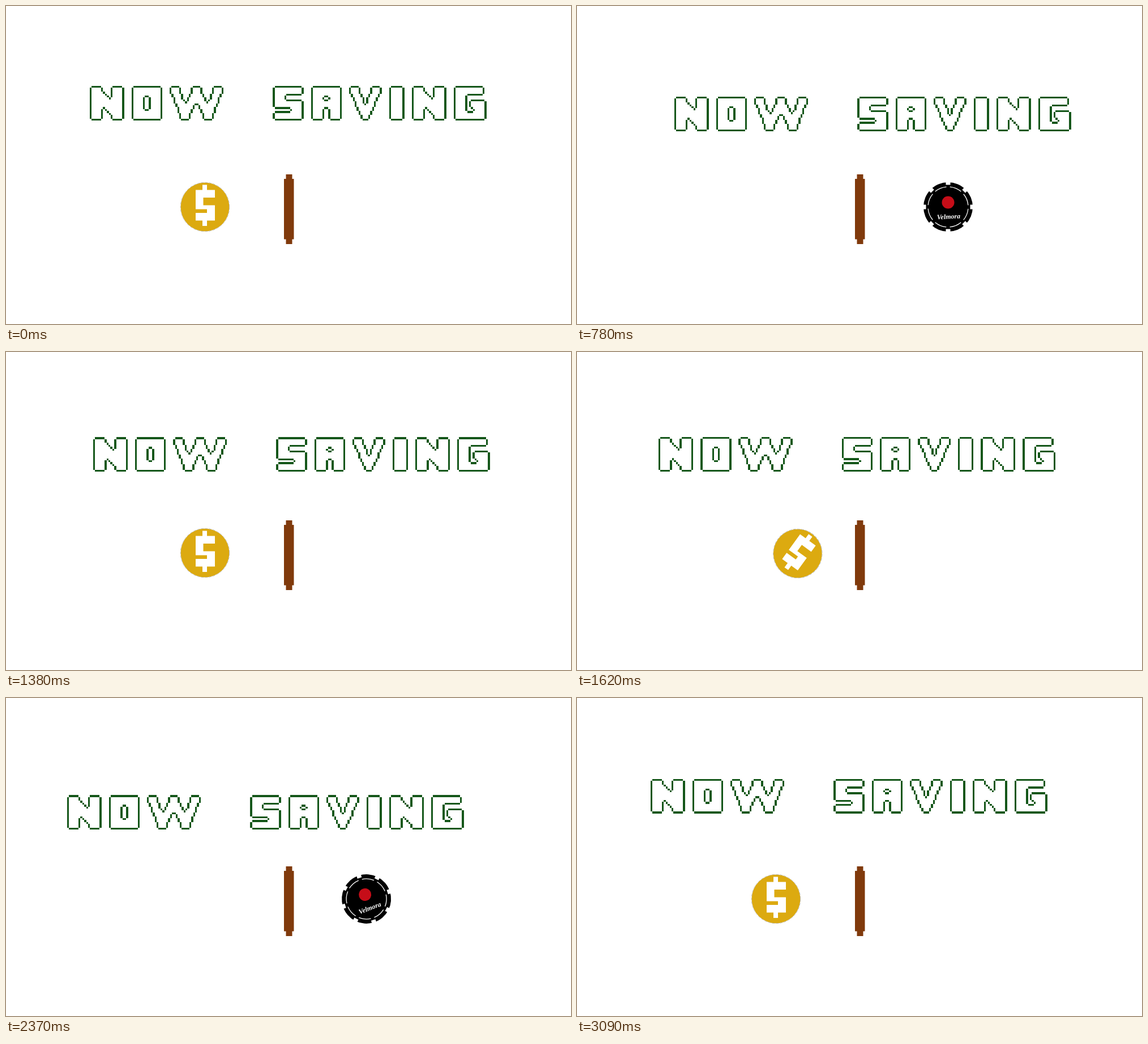
Write an HTML page with a canvas that moves like this. It is 998 px wide and 561 px high and loops after 3.12 s.

```html
<!DOCTYPE html>
<html lang="en">
<head>
<meta charset="utf-8">
<title>Now saving</title>
<style>
html, body { margin: 0; width: 100%; height: 100%; overflow: hidden; background: #fff; }
canvas { display: block; }
</style>
</head>
<body>
<canvas id="stage" width="998" height="561" role="img" aria-label="NOW SAVING"></canvas>
<script>
const ctx = document.getElementById('stage').getContext('2d');
const STEP = 30, LOOP = 3120, LEG = 26, ROLL = 20;
const CELL = 3.4, GAP = 3.8, SPACE = 18;
const GREEN = '#15571a', BROWN = '#803a0c', GOLD = '#dcaa10';
const SLOT_X = 500, START_X = 351.5, TRAVEL = 304, MID_Y = 354.5, R = 43.5;
const clamp = (v, lo, hi) => Math.min(hi, Math.max(lo, v));

// Each letter is a path swept by a blocky brush; only the rim is drawn.
const skeletons = {
  N: '3,15 3,2 14,15 14,2',
  O: '3,2 12,2 12,15 3,15 3,3 12,3 12,14 3,14',
  W: '2.5,2 7.5,15 13.5,2 19.5,15 24.5,2',
  S: '12,2 3,2 3,9 12,9 12,15 3,15',
  A: '3,15 3,2 12,2 12,15 12,9 3,9 3,3 12,3',
  V: '2.5,2 8,15 13.5,2',
  I: '3.5,2 3.5,15',
  G: '12,2 3,2 3,15 13,15 13,9 11,9'
};
const brushWidth = { W: 2.5, V: 2.5, I: 3.5 };

function stamp(cells, cx, cy, rx, ry) {
  for (let x = Math.ceil(cx - rx); x <= cx + rx; x++) {
    for (let y = Math.ceil(cy - ry); y <= cy + ry; y++) {
      const corner = Math.abs(x - cx) > rx - 1 && Math.abs(y - cy) > ry - 1;
      if (!corner) cells.add(x + ',' + y);
    }
  }
}

function outline(ch) {
  const pts = skeletons[ch].split(' ').map(p => p.split(',').map(Number));
  const cells = new Set();
  for (let i = 1; i < pts.length; i++) {
    const [ax, ay] = pts[i - 1], [bx, by] = pts[i];
    const n = 2 * Math.max(Math.abs(bx - ax), Math.abs(by - ay));
    for (let k = 0; k <= n; k++) {
      stamp(cells, ax + (bx - ax) * k / n, ay + (by - ay) * k / n, brushWidth[ch] || 3, 2);
    }
  }
  const list = [...cells].map(c => c.split(',').map(Number));
  const has = (x, y) => cells.has(x + ',' + y);
  return {
    width: Math.max(...list.map(c => c[0])) + 1,
    rim: list.filter(([x, y]) => !(has(x - 1, y) && has(x + 1, y) && has(x, y - 1) && has(x, y + 1)))
  };
}

function layout(text) {
  const cells = [];
  let col = 0;
  for (const ch of text) {
    const glyph = ch === ' ' ? { width: SPACE, rim: [] } : outline(ch);
    for (const [x, y] of glyph.rim) cells.push([x + col, y]);
    col += glyph.width + GAP;
  }
  return cells;
}
const title = layout('NOW SAVING');

// Drift of the title: step, x, y
const drift = [
  [0, 147.5, 141], [8, 160, 118], [26, 171.5, 160], [38, 163, 156],
  [54, 144, 150], [69, 129, 189], [89, 93.5, 147], [103, 129.5, 142.5]
];

function slope(i, k) {
  const a = drift[Math.max(0, i - 1)], b = drift[Math.min(drift.length - 1, i + 1)];
  return (b[k] - a[k]) / (b[0] - a[0]);
}

// Smooth curve through the key points
function driftAt(s, k) {
  let i = 0;
  while (i < drift.length - 2 && drift[i + 1][0] <= s) i++;
  const a = drift[i], b = drift[i + 1], d = b[0] - a[0];
  const u = (s - a[0]) / d, u2 = u * u, u3 = u2 * u;
  return a[k] + (b[k] - a[k]) * (3 * u2 - 2 * u3)
    + d * (slope(i, k) * (u3 - 2 * u2 + u) + slope(i + 1, k) * (u3 - u2));
}

function drawTitle(s) {
  const x = driftAt(s, 1), y = driftAt(s, 2);
  ctx.fillStyle = GREEN;
  for (const [c, r] of title) {
    const left = Math.round(x + c * CELL), top = Math.round(y + r * CELL);
    const right = Math.round(x + (c + 1) * CELL), bottom = Math.round(y + (r + 1) * CELL);
    ctx.fillRect(left, top, right - left, bottom - top);
  }
}

function disc(x, y, r, color) {
  ctx.fillStyle = color;
  ctx.beginPath();
  ctx.arc(x, y, r, 0, 7);
  ctx.fill();
}

function drawCoin() {
  disc(0, 0, 43, GOLD);
  ctx.strokeStyle = '#bdbdb8';
  ctx.setLineDash([5, 2]);
  ctx.beginPath();
  ctx.arc(0, 0, 43.2, 0, 7);
  ctx.stroke();
  ctx.fillStyle = '#fff';
  ctx.fillRect(-4.5, -39, 8, 72.5);
  ctx.fillRect(-16.5, -30, 34, 54);
  ctx.fillStyle = GOLD;
  ctx.fillRect(-3, -16.5, 21, 13.5);
  ctx.fillRect(-17, 4, 20.5, 6.5);
}

function drawChip() {
  disc(0, 0, R, '#000');
  ctx.fillStyle = ctx.strokeStyle = '#fff';
  ctx.lineWidth = 1.3;
  for (let i = 0; i < 8; i++) {
    ctx.fillRect(-4, -R - 1, 8, 5.5);
    ctx.beginPath();
    ctx.arc(0, 0, 35.5, 0.09, 0.7);
    ctx.stroke();
    ctx.rotate(Math.PI / 4);
  }
  disc(0, -8, 11, '#c60d18');
  ctx.rotate(-0.05);
  ctx.fillStyle = '#fff';
  ctx.font = 'italic bold 12px "Liberation Serif", serif';
  ctx.textAlign = 'center';
  ctx.fillText('Velmora', 0, 21);
}

function drawHalf(left, x, y, angle, draw) {
  ctx.save();
  ctx.beginPath();
  ctx.rect(left, 0, SLOT_X, 561);
  ctx.clip();
  ctx.translate(x, y);
  ctx.rotate(angle);
  draw();
  ctx.restore();
}

// Steady start, slow finish
const glide = p => p + p * (1 - p) * (0.22 + 0.7 * p);

// Coin on the left of the bar, chip on the right, rolling there and back
function drawRoller(s) {
  const back = Math.floor(s / LEG) % 2 === 1;
  const p = Math.min(1, (s % LEG) / ROLL);
  const f = back ? 1 - glide(p) : glide(p);
  const x = START_X + TRAVEL * f;
  const y = MID_Y + clamp((TRAVEL * Math.min(f, 1 - f) - 28) * 0.09, 0, 3.5);
  const angle = (back ? 1 - p : p) * Math.PI * 2;
  drawHalf(0, x, y, angle, drawCoin);
  drawHalf(SLOT_X, x, y, angle, drawChip);
  return x;
}

function drawBar(x) {
  ctx.fillStyle = BROWN;
  ctx.fillRect(491, 305, 17.5, 106.5);
  ctx.fillRect(494.5, 297, 11, 123);
  ctx.globalAlpha = clamp((90 - Math.abs(x - SLOT_X)) / 30, 0, 1);
  ctx.fillStyle = '#000';
  ctx.fillRect(503.7, 327, 1.6, 52);
  ctx.globalAlpha = 1;
}

function frame() {
  const s = Math.floor((performance.now() % LOOP) / STEP);
  ctx.fillStyle = '#fff';
  ctx.fillRect(0, 0, 998, 561);
  drawBar(drawRoller(s));
  drawTitle(s);
  requestAnimationFrame(frame);
}
frame();
</script>
</body>
</html>
```
